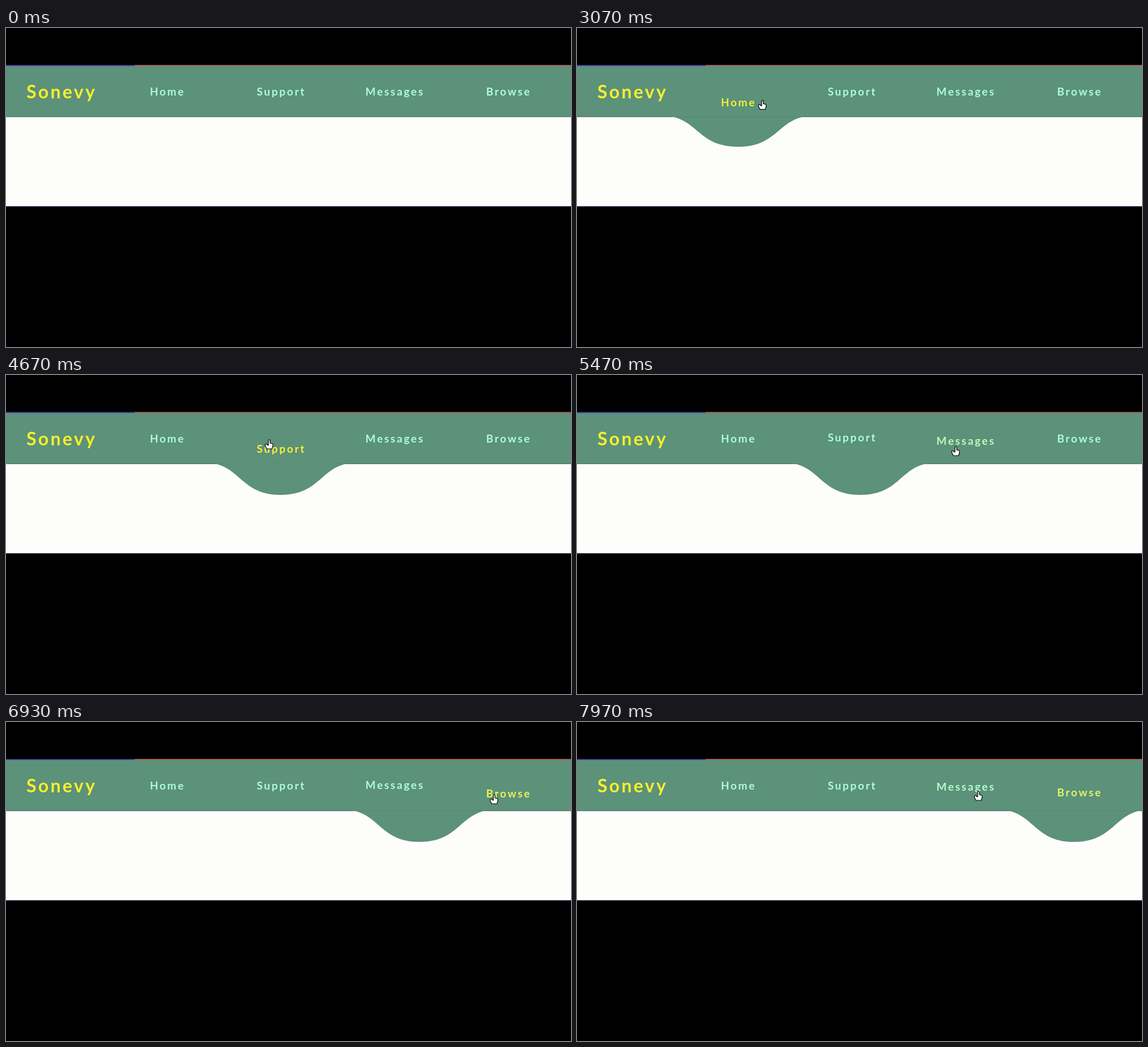
An HTML page for the animation above (8 s loop, 997x562 px).

```html
<!DOCTYPE html>
<html lang="en">
<head>
<meta charset="utf-8">
<title>Navigation bar</title>
<style>
  html, body { margin: 0; width: 100%; height: 100%; overflow: hidden; background: #000; }
  svg { display: block; width: 100vw; height: 100vh; }
  text { font-family: Lato, "Open Sans", sans-serif; font-weight: 700; }
  .brand { font-size: 32px; letter-spacing: 3.3px; fill: #f8f02c; }
  .item { font-size: 19px; letter-spacing: 2.7px; text-anchor: middle; }
</style>
</head>
<body>
<svg viewBox="0 0 997 562">
  <rect width="997" height="562"/>
  <rect y="156" width="997" height="158" fill="#fdfdfc"/>
  <rect y="314" width="997" height="1" fill="#1c1c48"/>
  <rect y="156" width="997" height="1" fill="#4a6f5e"/>
  <path id="bump" fill="#5c917a" d="M-116 0C-70 10-66 55 0 55S70 10 116 0z"/>
  <rect y="67" width="997" height="89.2" fill="#5c917a"/>
  <rect y="65" width="997" height="2" fill="#a65e55"/>
  <rect y="65" width="227" height="2" fill="#45389a"/>
  <text class="brand" x="36" y="124">Sonevy</text>
  <g id="menu"></g>
  <path id="hand" fill="#fff" stroke="#000" stroke-width="1.2" stroke-linejoin="round"
    d="M-1-1V-7Q.5-9 2-7V-2L6-1Q7.5 0 7 2L5.5 8H-4L-6.5 3V0Q-5-1-3.5 0V1L-1 2z"/>
</svg>
<script>
const LOOP = 8000, DROP = 17.5, TEXT_MS = 210, BUMP_MS = 600, RISE_MS = 250;
const MINT = [172, 255, 220], YELLOW = [248, 240, 52];
const LABELS = ['Home', 'Support', 'Messages', 'Browse'];
const itemX = i => 284 + 200.7 * i;

const visits = [
  { item: 0, enter: 2880, leave: 4010 },
  { item: 1, enter: 4060, leave: 5310 },
  { item: 2, enter: 5419, leave: 6730 },
  { item: 3, enter: 6831, leave: 7911 },
  { item: 2, enter: 7934, leave: LOOP }
];

// The pointer glides from one key point to the next.
const pointer = [
  { t: 2440, x: 300, y: 308 },
  { t: 3230, x: 330, y: 115 },
  { t: 3930, x: 330, y: 115 },
  { t: 4670, x: 464, y: 122 },
  { t: 5200, x: 470, y: 124 },
  { t: 5470, x: 668, y: 134 },
  { t: 6650, x: 712, y: 130 },
  { t: 6930, x: 861, y: 136 },
  { t: 7230, x: 898, y: 131 },
  { t: 7800, x: 898, y: 131 },
  { t: 7970, x: 708, y: 130 }
];

const clamp = v => Math.min(1, Math.max(0, v));
const mix = (a, b, p) => a + (b - a) * p;
const smooth = p => p * p * (3 - 2 * p);

function bezier(x1, y1, x2, y2) {
  const at = (a, b, s) => 3 * a * s * (1 - s) ** 2 + 3 * b * s * s * (1 - s) + s ** 3;
  return x => {
    if (x <= 0) return 0;
    if (x >= 1) return 1;
    let lo = 0, hi = 1;
    for (let i = 0; i < 24; i++) {
      const mid = (lo + hi) / 2;
      if (at(x1, x2, mid) < x) lo = mid; else hi = mid;
    }
    return at(y1, y2, lo);
  };
}
const ease = bezier(.25, .1, .25, 1);
const spring = bezier(.45, 0, .4, 1.6);

const byId = id => document.getElementById(id);
const bump = byId('bump'), hand = byId('hand');
const nodes = LABELS.map((label, i) => {
  const node = document.createElementNS('http://www.w3.org/2000/svg', 'text');
  node.setAttribute('class', 'item');
  node.setAttribute('x', itemX(i) + 1);
  node.textContent = label;
  byId('menu').append(node);
  return node;
});

function drawItem(node, i, t) {
  let p = 0;
  for (const v of visits) {
    if (v.item === i) p += spring((t - v.enter) / TEXT_MS) - spring((t - v.leave) / TEXT_MS);
  }
  const color = MINT.map((c, k) => Math.round(mix(c, YELLOW[k], clamp(p))));
  node.setAttribute('y', 119 + DROP * p);
  node.setAttribute('fill', `rgb(${color})`);
}

function drawBump(t) {
  let x = itemX(0);
  for (const v of visits) x = mix(x, itemX(v.item), ease((t - v.enter) / BUMP_MS));
  const rise = ease((t - visits[0].enter) / RISE_MS);
  bump.setAttribute('transform', `translate(${x} 156.2) scale(1 ${rise})`);
}

function drawHand(t) {
  let { x, y } = pointer[0];
  for (let i = 1; i < pointer.length; i++) {
    const a = pointer[i - 1], b = pointer[i];
    const p = smooth(clamp((t - a.t) / (b.t - a.t)));
    x = mix(x, b.x, p);
    y = mix(y, b.y, p);
  }
  hand.style.display = t < pointer[0].t ? 'none' : '';
  hand.setAttribute('transform', `translate(${x} ${y})`);
}

function frame(now) {
  const t = now % LOOP;
  nodes.forEach((node, i) => drawItem(node, i, t));
  drawBump(t);
  drawHand(t);
  requestAnimationFrame(frame);
}
frame(performance.now());
</script>
</body>
</html>
```
